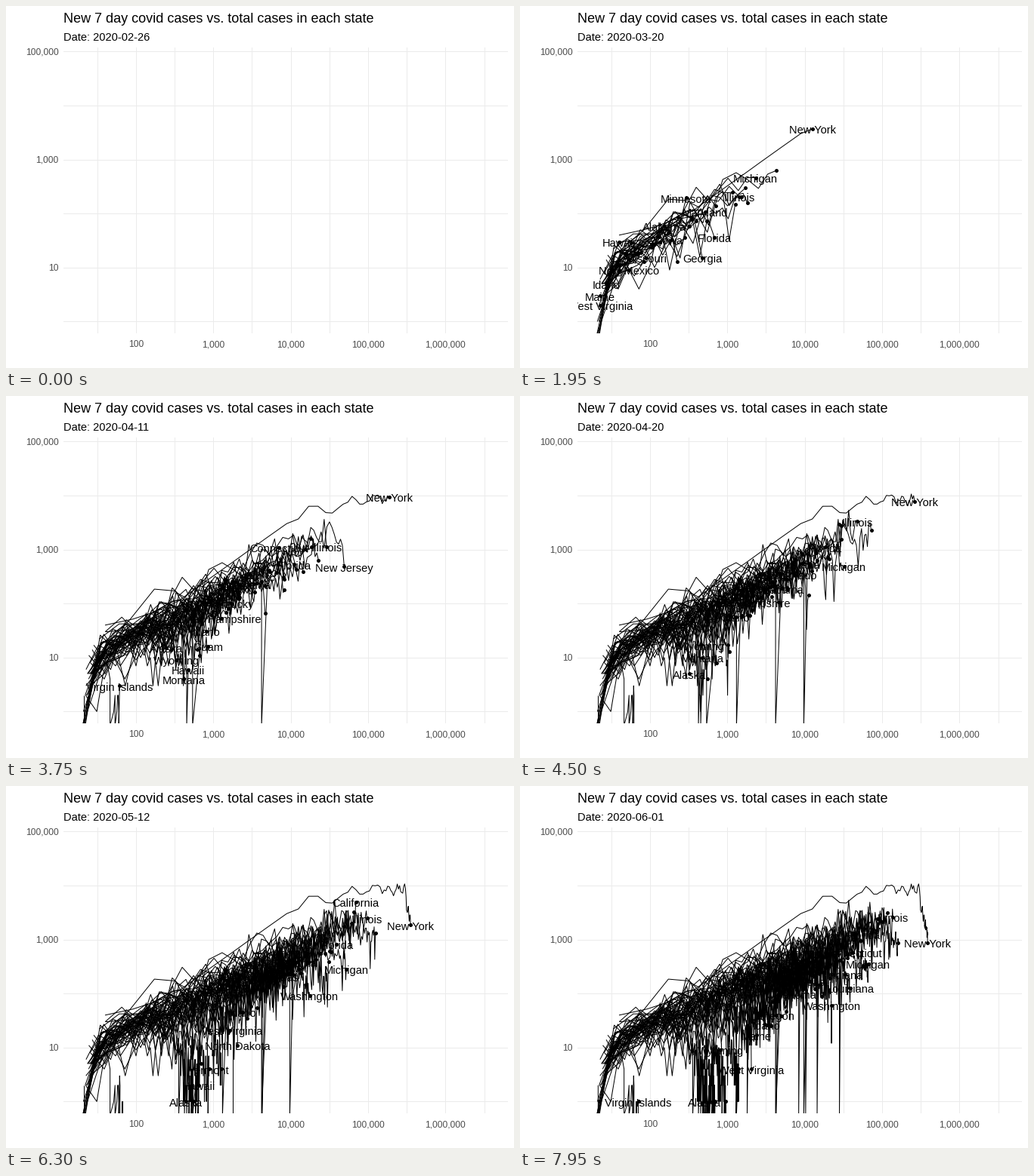
Write a matplotlib script that moves like this. It is 672 by 480 pixels and loops after 8 s.

```python
import math

import numpy as np
import matplotlib.pyplot as plt
from matplotlib.animation import FuncAnimation
from matplotlib.collections import LineCollection

W, H, DPI = 672, 480, 96
LEFT, RIGHT, TOP, BOTTOM = 76, 664, 55, 434
X_HUNDRED, X_DECADE = 171.97, 102.34   # pixel of 100 and pixels per power of ten
Y_ONE, Y_DECADE = 418.4, 71.6
FLOOR, ZERO = 1.31, -0.26              # log of the first total; stand-in for log of no cases
ANCHOR, LAST = 35, 97                  # days since the first date
DAYS_PER_STEP = 1.822
FIRST_DATE = np.datetime64("2020-02-26")
TICK_MS, LOOP_MS, STEP_TICKS = 50, 8000, 3

plt.rcParams["font.family"] = "Liberation Sans"

# Largest final total first.
STATES = """New York,New Jersey,Illinois,California,Massachusetts,Pennsylvania,
Texas,Michigan,Florida,Maryland,Georgia,Virginia,Connecticut,Louisiana,Ohio,
Indiana,North Carolina,Colorado,Minnesota,Tennessee,Washington,Arizona,Iowa,
Wisconsin,Alabama,Mississippi,Rhode Island,Nebraska,Missouri,South Carolina,
Utah,Kentucky,Kansas,Delaware,District of Columbia,Nevada,New Mexico,Arkansas,
Oklahoma,South Dakota,New Hampshire,Oregon,Puerto Rico,Idaho,North Dakota,Maine,
West Virginia,Guam,Vermont,Wyoming,Hawaii,Montana,Alaska,Virgin Islands,
Northern Mariana Islands""".replace("\n", "").split(",")

# These get label space first, in this order.
PROMINENT = """Florida,Illinois,New York,Michigan,California,Massachusetts,
Louisiana,Alabama,Alaska,Georgia,Hawaii,Idaho,Indiana,Iowa,Kentucky,Kansas,
Maryland,Missouri,Montana,New Hampshire,Virgin Islands,Vermont,Wyoming,
Washington""".replace("\n", "").split(",")

EARLY = ["Washington", "California", "Massachusetts"]
PEAKED = ["New Jersey", "Michigan", "Louisiana", "Washington", "Hawaii",
          "Vermont", "Montana", "Guam"]

# Final log total against rank, and the log of daily cases in the hardest hit state.
RANK_KEYS = [(0, 5.57), (1, 5.21), (4, 5.0), (8, 4.76), (20, 4.35), (37, 3.89),
             (46, 3.31), (48, 2.98), (52, 2.7), (53, 1.85), (54, 1.345)]
SURGE_KEYS = [(11, 1.6), (15, 2.05), (19, 2.75), (23, 3.48), (26, 3.74), (31, 3.85),
              (39, 4.0), (46, 3.93), (59, 3.92), (63, 3.58), (77, 3.3), (97, 3.08)]


def along(keys, value):
    return np.interp(value, *zip(*keys))


def growth_path(name, rank, rng):
    """Totals climb along a hyperbola in log space; daily cases are its noisy steps."""
    final = along(RANK_KEYS, rank)
    peaked = name in PEAKED
    gap = 0.22 if peaked else min(0.3 + 0.005 * rank, 0.45) + rng.uniform(-0.04, 0.04)
    height = final - FLOOR
    if name in EARLY:
        start = 8 + 1.5 * EARLY.index(name)
    else:
        start = max(rng.uniform(13.5, 16.5), ANCHOR - 10 * height * (1 - gap))
    u_anchor = (ANCHOR - start) / (LAST - start)
    bend = (1 - u_anchor - gap) / (gap * u_anchor)

    def log_total(day):
        u = np.maximum((day - start) / (LAST - start), 0)
        return final - height * (1 - u) / (1 + bend * u)

    days = np.arange(math.ceil(start), LAST + 1)
    x = log_total(days)
    trend = 10 ** x - 10 ** log_total(days - 1)
    if peaked:
        trend *= 0.4 ** ((days - start) / (LAST - start))
    noise = rng.normal(0, 0.14, len(days))
    noise += 0.07 * np.sin(2 * np.pi * days / 7 + rng.uniform(0, 6))
    noise -= 0.6 * (rng.random(len(days)) < 0.03)
    new = rng.poisson(trend * 10 ** noise)
    new[rng.random(len(days)) < 0.002] = 0
    new[-1] = max(new[-1], 1)
    quiet = np.flatnonzero(new[1:] == 0) + 1
    x[quiet] = x[quiet - 1]
    return days, x, np.where(new > 0, np.log10(np.maximum(new, 1)), ZERO)


def surge_path(rng):
    days = np.arange(SURGE_KEYS[0][0], LAST + 1)
    trend = along(SURGE_KEYS, days)
    x = np.log10(np.cumsum(10 ** trend))
    ripple = 0.07 * np.sin(2 * np.pi * (days - 37) / 7) + rng.normal(0, 0.04, len(days))
    return days, x, trend + ripple * (days > 24)


rng = np.random.default_rng(19)
paths = {name: growth_path(name, rank, rng) if rank else surge_path(rng)
         for rank, name in enumerate(STATES)}
label_order = PROMINENT + [name for name in STATES if name not in PROMINENT]


def points(px):
    return px * 72 / DPI


fig = plt.figure(figsize=(W / DPI, H / DPI), dpi=DPI, facecolor="white")
ax = fig.add_axes([LEFT / W, 1 - BOTTOM / H, (RIGHT - LEFT) / W, (BOTTOM - TOP) / H])
ax.set_axis_off()
ax.set_xlim(2 + (LEFT - X_HUNDRED) / X_DECADE, 2 + (RIGHT - X_HUNDRED) / X_DECADE)
ax.set_ylim((Y_ONE - BOTTOM) / Y_DECADE, (Y_ONE - TOP) / Y_DECADE)

grid = dict(color="#EBEBEB", lw=points(1), zorder=0)
for value in np.arange(1.5, 6.6, 0.5):
    ax.axvline(value, **grid)
for value in range(6):
    ax.axhline(value, **grid)


def stage_text(x, baseline, text, size, **style):
    return fig.text(x / W, 1 - baseline / H, text, fontsize=points(size),
                    va="baseline", **style)


stage_text(76, 22, "New 7 day covid cases vs. total cases in each state", 18)
subtitle = stage_text(76, 46, "", 14.67)
for power in range(2, 7):
    stage_text(X_HUNDRED + X_DECADE * (power - 2), 452, f"{10 ** power:,}", 12,
               color="#4D4D4D", ha="center")
for power in (1, 3, 5):
    stage_text(69.5, Y_ONE + 4 - Y_DECADE * power, f"{10 ** power:,}", 12,
               color="#4D4D4D", ha="right")

trails = LineCollection([], colors="black", linewidths=points(1), zorder=2)
ax.add_collection(trails, autolim=False)
heads = ax.scatter([], [], s=points(5) ** 2, c="black", linewidths=0, zorder=3)
labels = {name: ax.text(3, 3, name, fontsize=points(14.67), ha="center",
                        va="baseline", clip_on=True, zorder=4) for name in label_order}
widths = {name: label.get_window_extent().width for name, label in labels.items()}


def place_label(name, x, y, taken):
    """Show a label on its point unless an earlier one is in the way."""
    px, py, half = x * X_DECADE, y * Y_DECADE, widths[name] / 2 + 0.5
    free = all(abs(px - qx) >= half + other or abs(py - qy) >= 12.5
               for qx, qy, other in taken)
    labels[name].set_visible(free)
    if free:
        labels[name].set_position((x, y - 6.3 / Y_DECADE))
        taken.append((px, py, half))


def update(tick):
    elapsed = math.floor(DAYS_PER_STEP * (tick // STEP_TICKS))
    subtitle.set_text(f"Date: {FIRST_DATE + elapsed}")
    segments, ends, taken = [], [], []
    for name in label_order:
        days, x, y = paths[name]
        labels[name].set_visible(False)
        shown = days <= elapsed + 1
        if not shown.any():
            continue
        trail = np.column_stack((x[shown], y[shown]))
        segments.append(trail)
        if trail[-1, 1] >= 0:
            ends.append(trail[-1])
            place_label(name, *trail[-1], taken)
    trails.set_segments(segments)
    heads.set_offsets(np.array(ends) if ends else np.empty((0, 2)))
    return [trails, heads, subtitle, *labels.values()]


anim = FuncAnimation(fig, update, frames=LOOP_MS // TICK_MS, interval=TICK_MS,
                     repeat=True, repeat_delay=0, blit=False)
plt.show()
```
